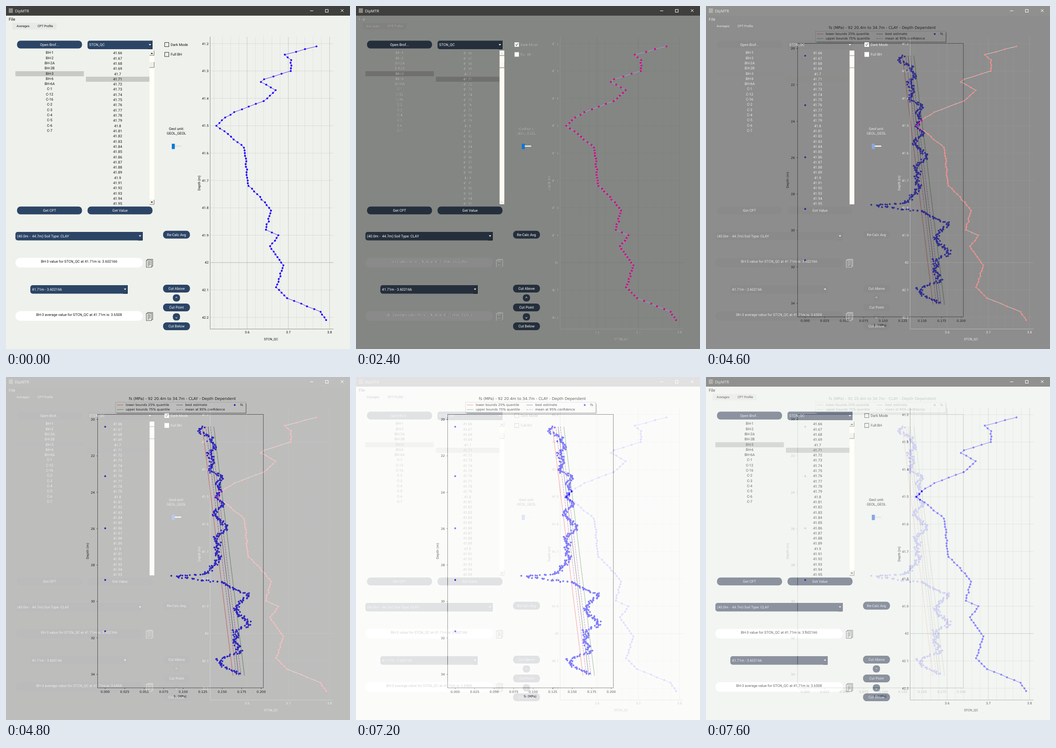
Write an HTML page with a canvas that moves like this. It is 749x747 px and loops after 7.8 s.

```html
<!DOCTYPE html>
<html lang="en">
<head>
<meta charset="utf-8">
<title>Depth averages</title>
<style>
html, body { margin: 0; width: 100%; height: 100%; overflow: hidden; background: #eef1ec; }
canvas { display: block; }
</style>
</head>
<body>
<canvas id="stage" width="749" height="747"></canvas>
<script>
const W = 749, H = 747, HOLD = 2000, STEP = 200, PART = HOLD + 3 * STEP;
const BLUE = '#2000ff';
const UI = 'Roboto, sans-serif', CHART = '"DejaVu Sans", sans-serif';

const light = {
  bg: '#eef1ec', ink: '#111', button: '#2c4566', panel: '#fff', pick: '#c8cac6', edge: '#14202f',
  track: '#fffff6', groove: '#dfe1de', line: BLUE, dot: BLUE, axis: '#8f918e', grid: '0,0,0'
};
const dark = {
  bg: '#333532', ink: '#fff', button: '#222421', panel: '#222421', pick: '#2c2e2b', edge: '#0c0d0c',
  track: '#fffaf2', groove: '#fff', line: '#fff', dot: '#f00', axis: '#90928f', grid: '255,255,255'
};

// Turning points of the profile: sample number, x
const turns = [[0, 676], [3, 607], [5, 621], [9, 620], [12, 562], [13, 555], [16, 587], [20, 561], [24, 497],
  [27, 470], [29, 458], [33, 490], [37, 518], [51, 528], [57, 564], [60, 577], [67, 566], [69, 593], [73, 575],
  [80, 604], [88, 588], [92, 612], [97, 685], [100, 697]];

// Turning points of the scatter: x, y
const bends = [[432, 109], [416, 118], [445, 130], [446, 142], [457, 152], [441, 164], [450, 182], [443, 202],
  [470, 219], [459, 233], [466, 247], [458, 264], [474, 277], [452, 296], [480, 328], [456, 351], [466, 364],
  [457, 374], [466, 396], [450, 412], [436, 429], [366, 434], [418, 441], [470, 447], [500, 463], [530, 475],
  [502, 497], [505, 517], [530, 534], [527, 541], [500, 550], [502, 580], [508, 600], [462, 615], [474, 630],
  [512, 648]];

function random(seed) {
  return () => (seed = seed * 16807 % 2147483647) / 2147483647;
}
function lerp(a, b, u) {
  return a + (b - a) * u;
}

let rnd = random(7);
const profile = Array.from({ length: 101 }, (_, i) => {
  const k = Math.max(1, turns.findIndex(p => p[0] >= i));
  const [a, xa] = turns[k - 1], [b, xb] = turns[k];
  const wobble = i === a || i === b ? 0 : (rnd() - 0.5) * 4;
  return [lerp(xa, xb, (i - a) / (b - a)) + wobble, 88 + i * 5.96];
});

let g;

function rect(x0, y0, x1, y1, fill, r = 0) {
  g.fillStyle = fill;
  g.beginPath();
  g.roundRect(x0, y0, x1 - x0, y1 - y0, r);
  g.fill();
}
function path(pts, color, width = 1, dash = []) {
  g.strokeStyle = color;
  g.lineWidth = width;
  g.setLineDash(dash);
  g.beginPath();
  pts.forEach(p => g.lineTo(p[0], p[1]));
  g.stroke();
  g.setLineDash([]);
}
function frame(x, y, w, h, color, width = 1) {
  g.strokeStyle = color;
  g.lineWidth = width;
  g.strokeRect(x, y, w, h);
}
function dot(x, y, r, color) {
  g.fillStyle = color;
  g.beginPath();
  g.arc(x, y, r, 0, 7);
  g.fill();
}
function tri(x, y, w, h, color) {
  g.fillStyle = color;
  g.beginPath();
  g.moveTo(x - w, y - h);
  g.lineTo(x + w, y - h);
  g.lineTo(x, y + h);
  g.fill();
}
// y is the middle of the capitals
function text(s, x, y, color, size = 7.8, align = 'center', font = UI) {
  g.font = `${size}px ${font}`;
  g.fillStyle = color;
  g.textAlign = align;
  g.fillText(s, x, y + size * 0.36);
}
function upright(s, x, y, ...style) {
  g.save();
  g.translate(x, y);
  g.rotate(-Math.PI / 2);
  text(s, 0, 0, ...style);
  g.restore();
}

function scene(draw) {
  const c = document.createElement('canvas');
  c.width = W;
  c.height = H;
  g = c.getContext('2d');
  g.textRendering = 'geometricPrecision';
  draw();
  return g.getImageData(0, 0, W, H);
}

function titleBar() {
  rect(0, 0, W, 21, '#3f403d');
  rect(6, 5, 15, 15, '#8d8985');
  text('DipMTR', 19.5, 10.5, '#fff', 8.4, 'left', '"Open Sans", sans-serif');
  path([[662, 10.5], [669, 10.5]], '#fff');
  frame(695.5, 7.5, 6, 6, '#fff');
  path([[729, 7], [735, 13]], '#fff');
  path([[735, 7], [729, 13]], '#fff');
}

function button(s, x0, y, x1, c) {
  rect(x0, y - 8.5, x1, y + 8.5, c.button, 7.5);
  text(s, (x0 + x1) / 2, y, '#fff');
}
function combo(s, x0, y, x1, c) {
  rect(x0, y - 9, x1, y + 9.5, c.button, [5, 0, 0, 5]);
  path([[x1 - 10, y + 9], [x1 - 0.5, y + 9], [x1 - 0.5, y - 9]], c.edge);
  tri(x1 - 5.7, y, 2.7, 1.4, '#fff');
  text(s, x0 + 3.5, y, '#fff', 7.8, 'left');
}
function result(s, y, c) {
  rect(20.5, y - 10.5, 298, y + 10.5, c.panel, 10);
  text(s, 159, y - 3, c.ink);
  const col = c === dark ? '#d8d8d6' : '#444';
  path([[308, y - 5], [308, y - 7.5], [319.5, y - 7.5], [319.5, y + 8], [317, y + 8]], col, 0.9);
  frame(305.5, y - 5.5, 11.5, 15.5, col, 0.9);
  for (let i = 0; i < 5; i++) path([[308, y - 2.5 + i * 2.3], [i === 4 ? 312 : 315, y - 2.5 + i * 2.3]], col, 0.8);
}
function check(s, y, on, c) {
  rect(345, y - 5, 355, y + 5, c === dark ? '#fff' : c.bg);
  frame(345.5, y - 4.5, 9, 9, c === dark ? '#fff' : '#333');
  if (on) path([[347.5, y], [349.3, y + 2.2], [352.8, y - 2.5]], '#222', 1.2);
  text(s, 358.5, y, c.ink, 7.8, 'left');
}

function lists(c) {
  rect(20.5, 142, 169.5, 153, c.pick);
  rect(174, 154, 312.5, 165, c.pick);
  'BH-1 BH-2 BH-2A BH-2B BH-3 BH-6 BH-6A C-1 C-12 C-16 C-2 C-3 C-4 C-5 C-6 C-7'.split(' ')
    .forEach((s, i) => text(s, 95, 101.5 + i * 11.3, c.ink));
  g.save();
  g.beginPath();
  g.rect(174, 96, 140, 337);
  g.clip();
  for (let i = 0; i < 30; i++) text(String(+(41.66 + i / 100).toFixed(2)), 243, 102.5 + i * 11.31, c.ink);
  g.restore();

  rect(312.5, 97, 323, 432, c.track);
  if (c === dark) {
    for (const y of [108, 134.5]) path([[312.5, y], [323, y]], '#555');
    return;
  }
  for (const [y0, y1] of [[97.5, 108], [122, 134.5], [422, 432.5]]) {
    rect(312.5, y0, 323, y1, '#f0f0ea');
    path([[312.5, y1 - 0.5], [322.5, y1 - 0.5], [322.5, y0]], '#777');
  }
  tri(317.5, 103, 2.5, -1.3, '#000');
  tri(317.5, 427.5, 2.5, 1.3, '#000');
}

function profileChart(c) {
  const tint = a => `rgba(${c.grid},${a})`;
  for (let i = 0; i < 15; i++) {
    const x = 453.2 + i * 17.95;
    path([[x, 67], [x, 703]], tint(i % 5 === 4 ? 0.16 : 0.06));
  }
  for (let i = 0; i < 11; i++) {
    const y = 82 + i * 59.6;
    path([[444, y], [713, y]], tint(i === 8 ? 0.25 : 0.09));
    text(String(+(41.2 + i / 10).toFixed(1)), 441, y, c.ink, 7.3, 'right');
  }
  path([[444.5, 67], [444.5, 703.5], [713, 703.5]], c.axis);
  ['3.6', '3.7', '3.8'].forEach((s, i) => text(s, 525 + i * 89.8, 710, c.ink, 7.3));
  text('STCN_QC', 577, 725.5, c.ink, 7.1);
  upright('Depth (m)', 420, 385.5, c.ink, 7.4);
  path(profile, c.line, 0.8);
  profile.forEach(([x, y]) => dot(x, y, 2.1, c.dot));
}

function app(c) {
  rect(0, 0, W, H, c.bg);
  titleBar();
  text('File', 6, 28.5, c.ink, 8.9, 'left');
  if (c === light) rect(14, 37, 110, 51, '#e7e9e6');
  text('Averages', 37, 44, c.ink, 6.8);
  text('CPT Profile', 85.5, 44, c.ink, 6.8);

  button('Open Brof...', 24, 84, 165.5, c);
  combo('STCN_QC', 177.5, 84.5, 319, c);
  lists(c);
  button('Get CPT', 24, 445.3, 165.5, c);
  button('Get Value', 177.5, 445.3, 319, c);
  combo('(40.0m -  44.7m) Soil Type: CLAY', 20.5, 501, 297.5, c);
  result('BH-3 value for STCN_QC at 41.71m is: 3.602166', 559, c);
  combo('41.71m - 3.602166', 53, 617, 265, c);
  result('BH-3 average value for STCN_QC at 41.71m is: 3.6508', 675, c);

  check('Dark Mode', 84, c === dark, c);
  check('Full BH', 105.5, false, c);
  text('Geol unit:', 371, 267.5, c.ink);
  text('GEOL_GEOL', 371, 277.5, c.ink);
  rect(367, 304, 381.5, 306.5, c.groove);
  rect(361, 300, 367.5, 311.5, '#0a78d8');

  button('Re-Calc Avg', 342, 498, 400.5, c);
  ['Cut Above', 'Cut Point', 'Cut Below'].forEach((s, i) => button(s, 342, 615.5 + i * 41, 400.5, c));
  for (const [y, d] of [[635.7, 1.5], [677, -1.5]]) {
    rect(363.3, y - 7.8, 378.9, y + 7.8, c.button, 6.5);
    const m = d > 0 ? y - 1 : y + 2;
    path([[369.2, m + d], [371, m - d], [372.8, m + d]], '#fff', 0.8);
  }
  profileChart(c);
}

function scatter() {
  rnd = random(11);
  const spread = w => (rnd() + rnd() - 1) * w;
  bends.slice(1).forEach(([x1, y1], i) => {
    const [x0, y0] = bends[i];
    const n = Math.ceil(Math.max((y1 - y0) * 0.9, Math.abs(x1 - x0) * 0.2));
    for (let k = 0; k < n; k++) {
      const u = k / n;
      dot(lerp(x0, x1, u) + spread(8), lerp(y0, y1, u) + spread(2), 1.9, BLUE);
    }
  });
  for (const y of [108.3, 216, 329.5, 442, 553.7]) dot(216, y, 1.9, BLUE);
}

function depthPlot() {
  const ink = '#1a1a1a', red = '#ff7f7f', green = '#7fb07f', grey = '#7f7f7f', plum = '#bf7fbf';
  const dash = [4, 1.7];
  const label = (s, x, y, align, size = 6.93) => text(s, x, y, ink, size, align, CHART);
  rect(0, 0, W, H, '#fff');
  label('fs (MPa) - 92 20.4m to 34.7m - CLAY - Depth Dependent', 384, 47.5, 'center', 8.32);

  rect(240.5, 57, 523.5, 79.5, '#8c8c8c', 1.5);
  rect(238.5, 55, 522, 78, '#fff', 1.5);
  frame(238.5, 55, 283.5, 23, '#ccc', 0.7);
  [['lower bounds 25% quantile', 241.5, 61, red], ['upper bounds 75% quantile', 241.5, 71, green],
   ['best estimate', 371, 61, grey], ['mean at 95% confidence', 371, 71, plum, dash]]
    .forEach(([s, x, y, color, d]) => {
      path([[x, y], [x + 14, y]], color, 1.05, d);
      label(s, x + 19.3, y, 'left');
    });
  dot(498, 61, 1.9, BLUE);
  label('fs', 510, 61, 'left');

  [[427.5, red], [452.5, green], [440, grey], [435, plum, dash], [445, plum, dash]]
    .forEach(([x, color, d]) => path([[x, 108], [x + 66.7, 650.5]], color, 1.05, d));
  scatter();

  frame(199.7, 81.3, 360.5, 595.7, '#000', 0.6);
  for (let i = 0; i < 8; i++) {
    const y = 92.5 + i * 79.28;
    path([[197.2, y], [199.7, y]], '#000', 0.6);
    label(String(20 + i * 2), 193.5, y, 'right');
  }
  for (let i = 0; i < 9; i++) {
    const x = 216 + i * 42.47;
    path([[x, 677], [x, 679.5]], '#000', 0.6);
    label((i * 0.025).toFixed(3), x, 686, 'center');
  }
  label('fs (MPa)', 379, 696, 'center');
  upright('Depth (m)', 178, 379, ink, 6.93, 'center', CHART);
}

// Crossfade in linear light
const linear = Float32Array.from({ length: 256 }, (_, i) => (i / 255) ** 2.2);
function mix(a, b, k) {
  const out = new ImageData(W, H);
  for (let i = 0; i < out.data.length; i++) {
    const p = a.data[i], q = b.data[i];
    out.data[i] = p === q ? p : 255 * lerp(linear[p], linear[q], k) ** (1 / 2.2);
  }
  return out;
}

const scenes = [scene(() => app(light)), scene(() => app(dark)), scene(depthPlot)];
const pictures = scenes.flatMap((s, i) =>
  [s, ...[0.25, 0.5, 0.75].map(k => mix(s, scenes[(i + 1) % 3], k))]);

const stage = document.getElementById('stage').getContext('2d');
let shown = -1;
function tick() {
  const t = performance.now() % (3 * PART), u = t % PART;
  const n = Math.floor(t / PART) * 4 + (u < HOLD ? 0 : 1 + Math.floor((u - HOLD) / STEP));
  if (n !== shown) stage.putImageData(pictures[shown = n], 0, 0);
  requestAnimationFrame(tick);
}
tick();
</script>
</body>
</html>
```
